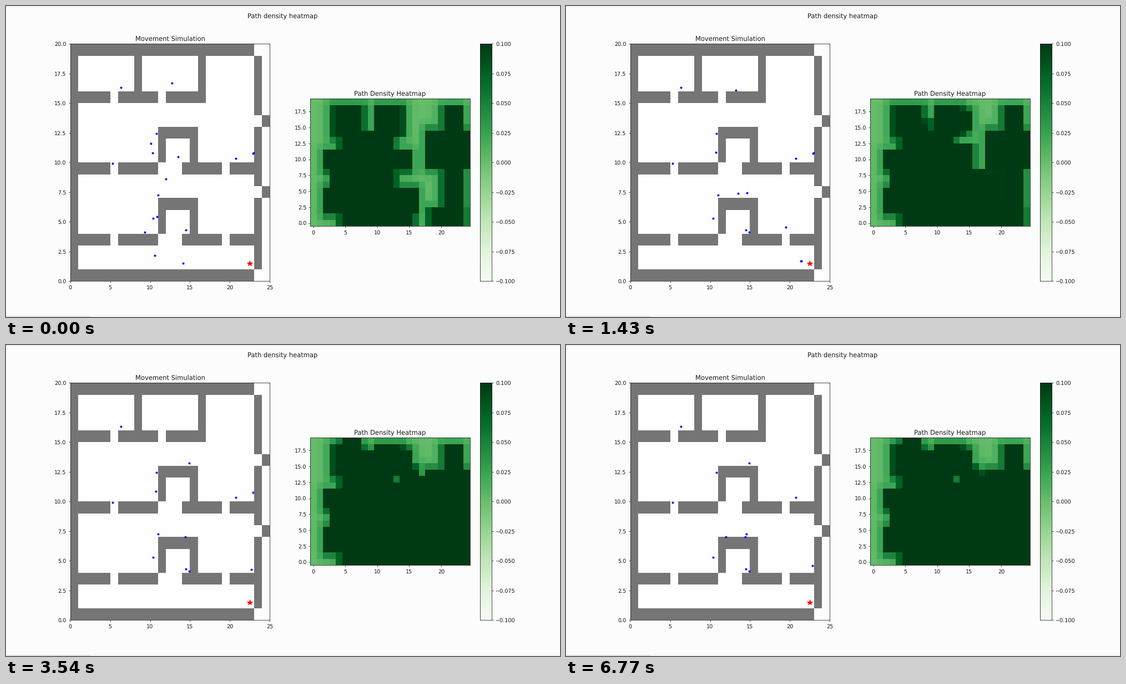
Animation, 998 px wide and 561 px high, one loop 6.8 s. Source, as a matplotlib script:

```python
import numpy as np
import matplotlib.pyplot as plt
from matplotlib.animation import FuncAnimation
from matplotlib.colors import ListedColormap
from matplotlib.patches import Rectangle

W, H, DPI = 998, 561, 64
FRAMES, STEP = 200, 34
K = 69.3 / DPI  # point scale
SPEED = 10.5    # floor units per second
STAR = (22.5, 1.5)
INK = "#1a1a1a"

plt.rcParams.update({
    "font.family": "DejaVu Sans",
    "font.size": 10 * K,
    "text.hinting": "none",
    "text.color": INK,
    "axes.edgecolor": INK,
    "axes.titlesize": 12 * K,
    "axes.titlepad": 6 * K,
    "axes.linewidth": 0.8 * K,
})
for side in ("xtick", "ytick"):
    plt.rcParams.update({
        f"{side}.color": INK,
        f"{side}.major.width": 0.8 * K,
        f"{side}.major.size": 3.5 * K,
        f"{side}.major.pad": 3.5 * K,
    })

# x, y, width, height of each wall
WALLS = [
    (0, 0, 1, 20), (0, 0, 23, 1), (0, 19, 23, 1),
    (23, 1, 1, 6), (24, 7, 1, 1), (23, 8, 1, 5), (24, 13, 1, 1), (23, 14, 1, 5),
    (8, 16, 1, 3), (16, 15, 1, 4), (1, 15, 4, 1), (6, 15, 5, 1), (12, 15, 5, 1),
]
for y in (3, 9):  # two identical storeys
    WALLS += [(0, y, 5, 1), (6, y, 5, 1), (14, y, 5, 1), (20, y, 3, 1),
              (11, y + 3, 5, 1), (11, y + 1, 1, 2), (15, y + 1, 1, 2)]

STILL = [(6.38, 16.3), (10.77, 12.42), (5.33, 9.9),
         (20.75, 10.35), (10.4, 5.27), (14.46, 4.3)]
DOOR = [(19.6, 10.3), (19.6, 9)]
EXIT = [(19.8, 3), STAR]

# Each walker is a chain of walks: departure time, waypoints
WALKERS = [
    [(0, [(12.75, 16.71), (13.25, 16.07)]),
     (1.75, [(13.25, 16.07), (11.6, 16), (11.6, 15), (14.93, 13.22)])],
    [(0, [(10.09, 11.59), (10.74, 10.86)]),
     (3.95, [(10.74, 10.86), (11.4, 9.8), (14.52, 7.25)])],
    [(0, [(10.32, 10.81), (11.5, 9.6), (13.53, 7.38)]),
     (1.45, [(13.53, 7.38), (14.38, 7.03)])],
    [(0, [(11.99, 8.62), (14.65, 7.45)]),
     (1.5, [(14.65, 7.45), (19.3, 4.3), (19.97, 3.95)]),
     (2.46, [(19.97, 3.95)] + EXIT)],
    [(4.3, [(11, 7.23), (11.98, 7)])],
    [(0.25, [(10.87, 5.44), (10.9, 4), (11.41, 3.69), (12.6, 2.95), (21.13, 1.73), STAR])],
    [(0.25, [(9.34, 4.11), (11.41, 3.69), (12.6, 2.95), (21.13, 1.73), STAR])],
    [(0, [(10.56, 2.14), (13.8, 3.4), (14.9, 4.12)])],
    [(0, [(14.1, 1.5), (18.48, 1.87), STAR])],
    [(0.55, [(13.5, 10.5), (13.5, 9), (19.47, 4.54)]),
     (1.46, [(19.47, 4.54)] + EXIT)],
    [(2.46, [(22.97, 10.81)] + DOOR + [(22.7, 4.24)]),
     (5.55, [(22.7, 4.24), (19.8, 4.1)] + EXIT)],
    [(4.1, [(22.88, 10.77)] + DOOR + [(22.82, 4.59)])],
]


def locate(walks, t):
    """Where a walker stands, or None once it has reached the star."""
    start, points = [w for w in walks if w is walks[0] or t >= w[0]][-1]
    p = np.array(points, float)
    s = np.r_[0, np.cumsum(np.hypot(*np.diff(p, axis=0).T))]
    gone = SPEED * (t - start)
    if gone >= s[-1] and points[-1] == STAR:
        return None
    return np.interp(gone, s, p[:, 0]), np.interp(gone, s, p[:, 1])


# Saturated zones: x0, x1, y0, y1
ZONES = [
    (3.1, 7.7, 13.5, 18.2), (10, 13.9, 14, 18.2), (4.2, 12.6, 11, 14),
    (2, 15, 8.3, 11), (2.9, 12.8, 5, 9), (2, 16, 1.5, 5.4), (4.2, 15.7, 0, 2),
    (18, 24, 8.7, 14.4), (20.4, 23, 14, 18), (20.3, 23.4, 2, 9), (18.2, 23.6, 0, 2),
]
# Zones that spread from their lower left corner: start, end, zone
SPREAD = [
    (0, 0.43, (16, 20, 0, 3)), (0, 0.43, (13, 15.5, 5, 12)),
    (0, 0.43, (14, 15, 14.5, 17.6)), (0, 2.4, (4.4, 7.2, 17, 19)),
    (0, 3.5, (8, 10, 15, 17.3)), (0.43, 1.43, (16, 20, 0, 8)),
    (1.43, 2.44, (14, 16.2, 9, 14.8)), (2.44, 3.7, (16, 18, 9, 13.9)),
    (2.44, 3.5, (23, 24, 0, 13)),
]
COL, ROW = np.meshgrid(np.arange(25), np.arange(20))


def gap(zone):
    """Distance of every cell from a zone."""
    x0, x1, y0, y1 = zone
    dx = np.maximum(np.maximum(x0 - COL, COL - x1), 0)
    dy = np.maximum(np.maximum(y0 - ROW, ROW - y1), 0)
    return np.hypot(dx, dy)


BASE = np.min([gap(z) for z in ZONES], axis=0)


def density(t):
    d = BASE
    for t0, t1, (x0, x1, y0, y1) in SPREAD:
        f = np.clip((t - t0) / (t1 - t0), 0, 1)
        if f > 0:
            d = np.minimum(d, gap((x0, x0 + f * (x1 - x0), y0, y0 + f * (y1 - y0))))
    return 0.1 * np.exp(-1.5 * d)


def axes(x0, y0, x1, y1):
    """Axes from pixel edges, measured from the top left."""
    ax = fig.add_axes([x0 / W, 1 - y1 / H, (x1 - x0) / W, (y1 - y0) / H])
    ax.set_facecolor("#fefefe")
    return ax


def bar(x, y, w, h, color):
    fig.add_artist(Rectangle((x / W, 1 - (y + h) / H), w / W, h / H,
                             transform=fig.transFigure, fc=color, lw=0))


greens = plt.get_cmap("Greens")(np.linspace(0, 1, 256))
greens[:, :3] **= 1.12
cmap = ListedColormap(greens)

fig = plt.figure(figsize=(W / DPI, H / DPI), dpi=DPI, facecolor="#fcfcfd")
fig.suptitle("Path density heatmap", fontsize=12 * K, x=498.6 / W, y=1 - 12.4 / H)
bar(0, 0, W, 1.5, "#f0f0f1")
bar(0, 558.5, W, 2.5, "#efeff1")
bar(0, 559, 153, 2, "#dcdcde")

plan = axes(115.6, 68.3, 475.4, 496.1)
plan.set(xlim=(0, 25), ylim=(0, 20), title="Movement Simulation",
         xticks=range(0, 26, 5), yticks=np.arange(0, 20.1, 2.5))
for x, y, w, h in WALLS:
    plan.add_patch(Rectangle((x, y), w, h, fc="#757575", lw=0, antialiased=False))
plan.plot(*STAR, "*", color="red", ms=10 * K, mew=K, zorder=3)
dots, = plan.plot([], [], "o", color="blue", ms=3.1 * K, mew=K, zorder=4)

heat = axes(548, 167.3, 835.9, 397.3)
image = heat.imshow(density(0), cmap=cmap, vmin=-0.1, vmax=0.1, origin="lower",
                    aspect="auto", interpolation="nearest")
heat.set(title="Path Density Heatmap", xticks=range(0, 21, 5),
         yticks=np.arange(0, 17.6, 2.5))

scale = axes(854, 68.3, 875.2, 496.1)
scale.imshow(np.linspace(0, 1, 256)[:, None], cmap=cmap, origin="lower",
             aspect="auto", extent=(0, 1, -0.1, 0.1))
scale.set(xticks=[], yticks=np.arange(-4, 5) * 0.025)
scale.yaxis.tick_right()


def update(i):
    t = i * STEP / 1000
    spots = STILL + [p for p in (locate(w, t) for w in WALKERS) if p]
    dots.set_data(*zip(*spots))
    image.set_data(density(t))
    return dots, image


anim = FuncAnimation(fig, update, frames=FRAMES, interval=STEP,
                     repeat=True, repeat_delay=0)
plt.show()
```
